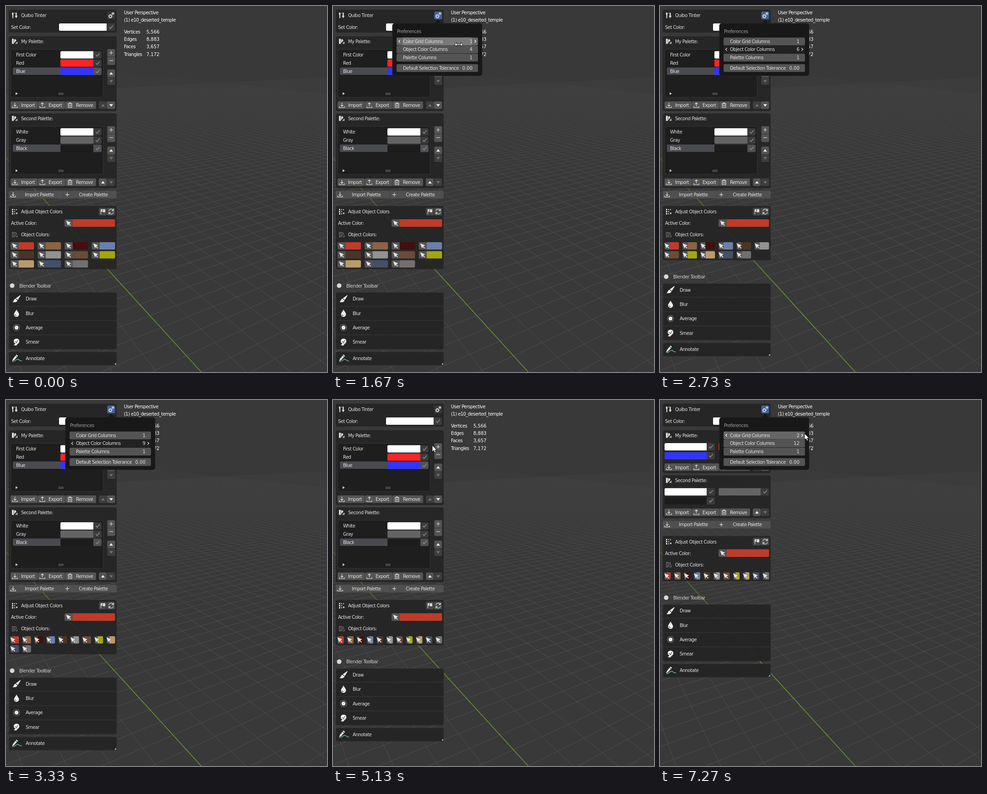
These frames come from a looping animation (702x798 px, 8000 ms). An HTML page:

```html
<!DOCTYPE html>
<html lang="en">
<head>
<meta charset="utf-8">
<title>Palette preferences</title>
<style>
html, body { margin: 0; width: 702px; height: 798px; overflow: hidden; background: #393939; }
svg { display: block; width: 702px; height: 798px; }
text { font: 10px "DejaVu Sans", sans-serif; letter-spacing: -.55px; fill: #e2e2e2; white-space: pre; }
text.num { letter-spacing: 0; }
.line { fill: none; stroke: #dcdcdc; stroke-width: 1.2; }
</style>
</head>
<body>
<svg viewBox="0 0 702 798">
  <defs>
    <linearGradient id="fade" gradientUnits="userSpaceOnUse" x1="0" y1="0" x2="0" y2="798">
      <stop offset=".17" stop-color="#4d4d4d" stop-opacity="0"/>
      <stop offset=".36" stop-color="#4d4d4d" stop-opacity=".55"/>
      <stop offset=".65" stop-color="#4d4d4d"/>
    </linearGradient>
    <linearGradient id="axis" gradientUnits="userSpaceOnUse" x1="0" y1="331" x2="0" y2="798">
      <stop offset="0" stop-color="#4c632c"/>
      <stop offset=".6" stop-color="#62922a"/>
    </linearGradient>
  </defs>
  <g id="scene"></g>
  <g id="ui"></g>
  <g id="pointer"></g>
</svg>
<script>
const $ = id => document.getElementById(id);
const LOOP = 8000;
const BUTTON = '#545454', DARK = '#3b3b3b', PANEL = 'rgba(36,36,36,.88)';

// Drawing helpers; text is placed by its vertical centre.
const rect = (x, y, w, h, fill, r = 2.5, more = '') =>
  `<rect x="${x}" y="${y}" width="${w}" height="${h}" rx="${r}" fill="${fill}" ${more}/>`;
const label = (x, y, s, more = '') => `<text x="${x}" y="${y + 3.7}" ${more}>${s}</text>`;
const line = (d, more = '') => `<path class="line" d="${d}" ${more}/>`;
const solid = (d, fill = '#dcdcdc', more = '') => `<path d="${d}" fill="${fill}" ${more}/>`;
const dot = (x, y, r, fill = '#dcdcdc') => `<circle cx="${x}" cy="${y}" r="${r}" fill="${fill}"/>`;
const at = (x, y, s, more = '') => `<g transform="translate(${x} ${y})" ${more}>${s}</g>`;
const range = (n, f) => Array.from({ length: n }, (_, i) => f(i)).join('');

// Two joined fields, rounded only on the outside.
const pair = (x, y, w1, w2, h, left, right) => {
  const r = 2.5;
  return solid(`M${x + w1} ${y}v${h}h${r - w1}q${-r} 0 ${-r} ${-r}v${2 * r - h}q0 ${-r} ${r} ${-r}z`, left) +
    solid(`M${x + w1} ${y}v${h}h${w2 - r}q${r} 0 ${r} ${-r}v${2 * r - h}q0 ${-r} ${-r} ${-r}z`, right);
};

const cog = (x, y, r, w) => `<circle class="line" cx="${x}" cy="${y}" r="${r}"
  style="stroke-width:${w}" stroke-dasharray="${r * .47} ${r * .315}"/>` +
  `<circle class="line" cx="${x}" cy="${y}" r="${r - .8}"/>`;

const icons = {
  brushes: solid('M-6-6h3.4v3l-.5 3v6h-2v-6l-.9-3zM2-6h2.5v7h2L3.3 6L0 1h2z') + line('M-1-5H1'),
  gear: cog(-1.8, 1.8, 3.3, 2.4) + cog(3.9, -4, 2, 1.7),
  swatches: solid('M-6-5.5h4.2v11h-4.2zM-1-3.5l2.2-1.6 2.6 3.2L-1 4z') + solid('M1 5.5l3.7-4.6h1.6v4.6z', '#aaa'),
  outline: line('M-5-5h3.5v10h-3.5zM0-3l2-1.5 2 2.5-4 6M2 5h3.5V1.5', 'stroke-opacity=".5"'),
  import: line('M0-5.5V2.5M-3-.5L0 2.5L3-.5M-5.5 2V5H5.5V2'),
  export: line('M0 2.5V-5.5M-3-2.5L0-5.5L3-2.5M-5.5 2V5H5.5V2'),
  trash: line('M-5-3.3H5M-1.7-3.3V-5.3H1.7V-3.3M-3.8-3V5H3.8V-3M-1.3-1V3M1.3-1V3'),
  plus: line('M-4 0H4M0-4V4'),
  minus: line('M-4 0H4'),
  up: solid('M-4 2.5L0-3L4 2.5z', '#eee'),
  down: solid('M-4-2.5L0 3L4-2.5z', '#eee'),
  check: line('M-4 0L-1.3 3L4.2-3.5', 'style="stroke:#8d8d8d;stroke-width:1.5"'),
  flag: line('M-4.5 5.5V-5') + solid('M-4.5-5H5V1.5H0V0H-4.5z') + solid('M-2-3.5H0v2h-2z', '#444'),
  refresh: line('M-5-1A5 5 0 0 1 4.5-2.5M5 1A5 5 0 0 1-4.5 2.5M5-6V-2H1M-5 6V2H-1'),
  nodes: range(3, i => solid(`M-6 ${i * 4.5 - 6}h3v3h-3z`) + solid(`M-1 ${i * 4.5 - 5.5}h2v2h-2z`)) +
    solid('M3-5.5h2v2h-2zM3 2h3v3h-3z'),
  select: solid('M-6-6L6-1.2L1.8 1L5.2 4.6L3.6 6L.3 2.6L-1.6 6z', '#e6e6e6', 'stroke="#333" stroke-width=".4"'),
  draw: solid('M8.3-8.3L9-7.5L2.8 2.6L-1.6-1.2zM-2.4-.4L2 3.4C1.5 7-4 8-9 7C-5.5 6-6 .5-2.4-.4z', '#eee'),
  blur: solid('M0-8C2-4 5.5-.5 5.5 2.5A5.5 5.5 0 0 1-5.5 2.5C-5.5-.5-2-4 0-8z', '#eee') +
    line('M-3.2 2.5A3.2 3.2 0 0 0 0 5.4', 'style="stroke:#555"'),
  average: dot(0, 0, 4.3, '#f0f0f0') + `<circle class="line" r="6.7" stroke-dasharray="1.5 2.01"/>`,
  smear: solid('M-6-3C-5-8 5-9 6-3C7 1 4 3 3 4L-1 8L-6 7L-2 3C-6 3-6 0-6-3z', '#eee') +
    line('M-4-1L0 1L3-4M0 1L1 3', 'style="stroke:#555"'),
  annotate: line('M-10 7C-4 8-2 1 2 2S6 7 11 5', 'style="stroke:#6fb79d;stroke-width:1.4"') +
    solid('M-1-8.5L2.2-5.4L-6 3.6L-10.8 6.5L-8.8 1.2z', '#eee') + line('M-3-6.5L.2-3.4', 'style="stroke:#444"'),
};
const icon = (name, x, y, dim) => at(x, y, icons[name], dim ? 'opacity=".3"' : '');

const cube = ['#bf3b2a', '#8b6345', '#42100f', '#6a80a8', '#4a3627', '#929292',
  '#6b4b38', '#a4a60d', '#b99b6b', '#445069', '#707070'];
const palettes = [
  { title: 'My Palette:', down: true, colors: [['First Color', '#fff'], ['Red', '#fd2427'], ['Blue', '#3136ff']] },
  { title: 'Second Palette:', colors: [['White', '#fff'], ['Gray', '#646464'], ['Black', '#1c1c1c']] },
];

function scene() {
  const va = [-216, 95], vb = [1840, 95], o = [427, 798];
  let s = '';
  for (let i = -8; i < 62; i++) s += `M${o[0] + 98 * i} 798L${va}`;
  for (let j = -8; j < 110; j++) {
    const w = 1 / (1 + j * .053);
    const x = va[0] + (o[0] - va[0]) * w, y = va[1] + (o[1] - va[1]) * w;
    const slope = (vb[1] - y) / (vb[0] - x);
    s += `M0 ${y - slope * x}L702 ${y + slope * (702 - x)}`;
  }
  const stats = [['Vertices', '5,566'], ['Edges', '8,883'], ['Faces', '3,657'], ['Triangles', '7,172']];
  const white = 'style="fill:#fff"';
  return `<path d="${s}" fill="none" stroke="url(#fade)"/>` +
    '<path d="M0 331L427 798" stroke="url(#axis)" stroke-width="1.6"/>' +
    label(258, 14.5, 'User Perspective', white) + label(258, 30.5, '(1) e10_deserted_temple', white) +
    stats.map(([k, v], i) => label(258, 56.5 + 16.1 * i, k, white) +
      label(307, 56.5 + 16.1 * i, v, white + ' class="num"')).join('');
}

const swatch = (x, y, w, color, side = DARK) => pair(x, y, w, 18, 16, color, side) +
  icon('check', x + w + 9.5, y + 8);

function colorList(p, y) {
  let s = rect(10.5, y + 28.5, 202, 104.5, '#1e1e1e', 4, 'stroke="#343434"');
  s += rect(15, y + 68, 193, 16, '#4a4b50');
  p.colors.forEach(([name, color], i) => {
    const c = y + 40.5 + 18 * i;
    s += label(22, c, name) + swatch(119, c - 8, 72, color, i === 2 ? '#505156' : DARK);
  });
  s += solid(`M21 ${y + 122}l5 3l-5 3z`, '#ccc');
  s += range(8, i => dot(116 + i % 4 * 2.8, y + 124 + (i >> 2) * 2.8, .75, '#ccc'));
  s += rect(221.5, y + 28, 17, 34.5, BUTTON) + rect(221.5, y + 72.5, 17, 17, BUTTON) + rect(221.5, y + 89.5, 17, 16.5, '#3d3d3d');
  s += solid(`M221.5 ${y + 44.7}h17v.8h-17z`, '#2b2b2b');
  return s + icon('plus', 230, y + 36) + icon('minus', 230, y + 53) +
    icon('up', 230, y + 81) + icon('down', 230, y + 98, true);
}

const colorGrid = (p, y) => p.colors.map(([, c], i) =>
  swatch(10 + i % 2 * 118.3, y + 28 + (i >> 1) * 19.6, 92, c)).join('');

function palette(p, y, grid) {
  const h = grid ? 93.3 : 163, b = y + h - 21, c = b + 8.5;
  let s = rect(6, y, 236, h, PANEL, 4) + icon('swatches', 19, y + 11) + label(33, y + 11, p.title);
  s += grid ? colorGrid(p, y) : colorList(p, y);
  s += rect(10, b, 59.5, 16.5, BUTTON) + rect(70, b, 59.5, 16.5, BUTTON) + rect(130, b, 67, 16.5, BUTTON);
  s += icon('import', 19.5, c) + label(33, c, 'Import') + icon('export', 79.5, c) + label(93, c, 'Export') +
    icon('trash', 140, c) + label(153, c, 'Remove');
  s += rect(203, b, 17, 16.5, p.down ? '#3d3d3d' : BUTTON) + rect(220.5, b, 18, 16.5, p.down ? BUTTON : '#3d3d3d');
  return s + icon('up', 212, c, p.down) + icon('down', 230, c, !p.down);
}

function adjust(y, cols) {
  const rows = Math.ceil(cube.length / cols), end = y + 79 + 19.6 * rows;
  let s = rect(6, y, 236, end - y, PANEL, 4) + icon('nodes', 19, y + 12.5) + label(33, y + 12.5, 'Adjust Object Colors');
  s += rect(203, y + 4, 17, 16.5, '#484848') + rect(220.5, y + 4, 18, 16.5, '#484848') +
    icon('flag', 212, y + 12.3) + icon('refresh', 230, y + 12.3);
  s += label(11, y + 37.5, 'Active Color:') + pair(128, y + 29, 17.5, 93, 16.5, BUTTON, cube[0]) +
    icon('select', 137, y + 37.5);
  s += icon('outline', 19, y + 62.5) + label(33, y + 62.5, 'Object Colors:');
  const pitch = 236.5 / cols, w = pitch - 8, bw = w * .345;
  return [s + cube.map((c, i) => {
    const x = 10 + i % cols * pitch, cy = y + 79 + Math.floor(i / cols) * 19.6;
    return pair(x, cy, bw, w - bw, 16, BUTTON, c) + icon('select', x + Math.max(bw / 2, 5), cy + 8);
  }).join(''), end];
}

function toolbar(y) {
  let s = dot(13.5, y + 36, 5, '#d8d8d8') + label(29, y + 36, 'Blender Toolbar', 'style="fill:#cfcfcf"');
  s += rect(6.5, y + 51, 235.5, 123.5, 'rgba(36,36,36,.93)', 3, 'stroke="#303030"');
  [['draw', 'Draw'], ['blur', 'Blur'], ['average', 'Average'], ['smear', 'Smear']].forEach(([id, name], i) => {
    const c = y + 64.7 + 31.3 * i;
    if (i) s += solid(`M7 ${c - 15.8}h235v1h-235z`, '#3a3a3a');
    s += icon(id, 23, c) + label(43, c, name);
  });
  s += rect(6.5, y + 180.5, 235.5, 29, 'rgba(36,36,36,.93)', 3, 'stroke="#303030"');
  return s + icon('annotate', 24, y + 194.5) + label(43, y + 194.5, 'Annotate') +
    solid(`M241 ${y + 204}v4h-4z`, '#bbb');
}

function popup({ values, row, zone, pressed }) {
  let s = solid('M222 39L230 30L238 39z', '#181818') +
    rect(130, 38, 196, 114, '#181818', 5, 'stroke="#202020"') + label(140, 55, 'Preferences', 'style="fill:#9a9a9a"');
  const names = ['Color Grid Columns', 'Object Color Columns', 'Palette Columns', 'Default Selection Tolerance'];
  names.forEach((name, i) => {
    const y = [68.7, 86.3, 103.9, 126.7][i], hot = i === row;
    s += rect(139, y, 178, 17, hot ? (pressed ? '#222' : '#666') : BUTTON);
    if (hot && !pressed && zone === 'mid') s += rect(152, y, 152, 17, '#797979', 0);
    if (hot) s += line(`M146.5 ${y + 5.3}l-3 3l3 3M309.5 ${y + 5.3}l3 3l-3 3`, 'style="stroke:#fff"');
    s += label(153, y + 8.3, name) + label(305, y + 8.3, values[i], 'text-anchor="end" class="num"');
  });
  return s;
}

function ui(st) {
  let s = rect(6, 8, 236, 50, PANEL, 4) + icon('brushes', 19, 20.5) + label(33, 20.5, 'Quibo Tinter');
  s += rect(221.5, 12, 17, 17, st.open ? '#436395' : st.gear ? '#444' : '#383838') + icon('gear', 230, 20.5);
  s += label(11, 46, 'Set Color:') + swatch(116, 38, 104, '#fff');
  const step = st.grid ? 98.2 : 168;
  s += palettes.map((p, i) => palette(p, 66 + step * i, st.grid)).join('');
  const y = 67 + 2 * step;
  s += rect(6, y, 118, 16.5, '#505050') + rect(124.5, y, 117.5, 16.5, '#505050') +
    icon('import', 15.5, y + 8.3) + label(73, y + 8.3, 'Import Palette', 'text-anchor="middle"') +
    icon('plus', 134, y + 8.3) + label(191, y + 8.3, 'Create Palette', 'text-anchor="middle"');
  const [panel, end] = adjust(y + 33, st.cols);
  return s + panel + toolbar(end) + (st.open ? popup(st) : '');
}

// Pointer path: time, x, y.
const path = [
  [270, 690, 780], [470, 560, 560], [730, 360, 230], [930, 255, 60], [1070, 230, 21],
  [1400, 230, 21], [1530, 246, 42], [1670, 275, 84], [1800, 297, 92], [1930, 321, 97], [2130, 315.5, 95],
  [4470, 315.5, 95], [4600, 296, 150], [4730, 250, 225], [4870, 222, 254], [5000, 215, 190],
  [5130, 217, 99], [5330, 226, 32], [5530, 230, 25],
  [6270, 230, 25], [6470, 236, 48], [6670, 245, 68], [6870, 285, 74], [7070, 316, 73], [LOOP, 316, 73],
];
const presses = [2270, 2530, 2730, 2930, 3130, 3330, 3530, 3730];
const releases = [2330, 2600, 2800, 3000, 3200, 3400, 3600, 3870];
const passed = (times, t) => times.filter(v => v <= t).length;

function pointerAt(t) {
  const i = Math.max(1, path.findIndex(p => p[0] >= t));
  const [t0, x0, y0] = path[i - 1], [t1, x1, y1] = path[i];
  const k = Math.max(0, (t - t0) / (t1 - t0));
  return [x0 + (x1 - x0) * k, y0 + (y1 - y0) * k];
}

function stateAt(t) {
  const [x, y] = pointerAt(t);
  const down = passed(presses, t), up = passed(releases, t);
  const open = t >= 1130 && t < 4670 || t >= 6000;
  const inside = open && x > 139 && x < 324 && y > 66 && y < 121;
  const grid = t >= 7270;
  return {
    open, grid,
    gear: x > 221 && x < 239 && y > 11 && y < 29,
    row: !inside ? -1 : y < 86 ? 0 : y < 104 ? 1 : 2,
    zone: x < 152 ? 'left' : x > 303 ? 'right' : 'mid',
    pressed: down > up || t >= 7200 && !grid,
    cols: Math.min(cube.length, 4 + Math.max(0, down - 1)),
    values: [grid ? 2 : 1, 4 + up, 1, '0.00'],
  };
}

const edge = 'stroke="#111" stroke-width="1" stroke-linejoin="round"';
const arrow = solid('M0 0V14L3.3 11L5.6 16L8 15L5.8 10.2H10.2z', '#fff', edge);
const resize = solid('M-9 0L-4.5-4V-1.2H4.5V-4L9 0L4.5 4V1.2H-4.5V4z', '#fff', edge);

function quantise(t) {
  const start = k => Math.round(k * 20 / 3) * 10;
  const k = Math.floor(t * 3 / 200) + 1;
  return start(k) <= t ? start(k) : start(k - 1) <= t ? start(k - 1) : start(k - 2);
}

let shown = '';
function draw(time) {
  const t = quantise(time % LOOP), st = stateAt(t), key = JSON.stringify(st);
  if (key !== shown) {
    $('ui').innerHTML = ui(st);
    shown = key;
  }
  const visible = t >= 270 && !st.pressed;
  $('pointer').innerHTML = visible ? at(...pointerAt(t), st.row >= 0 && st.zone === 'mid' ? resize : arrow) : '';
}

$('scene').innerHTML = scene();
const begin = performance.now();
function tick() {
  draw(performance.now() - begin);
  requestAnimationFrame(tick);
}
tick();
</script>
</body>
</html>
```
